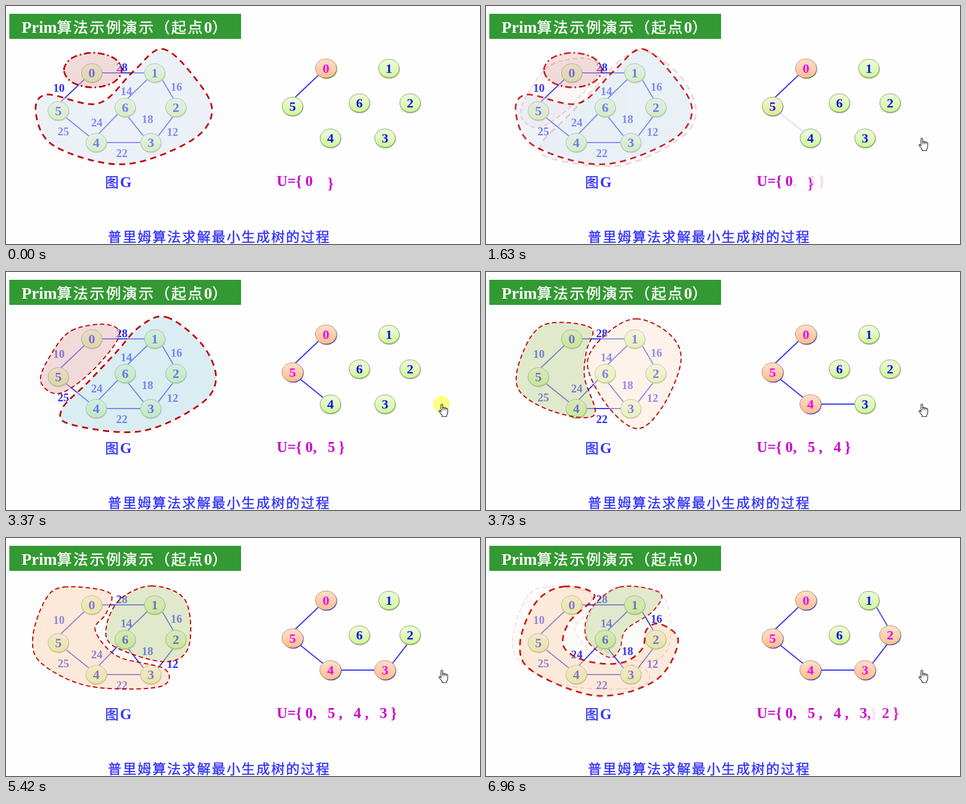
An HTML page for the animation above (8000 ms loop, 851 by 427 pixels).

```html
<!DOCTYPE html>
<html lang="zh">
<head>
<meta charset="utf-8">
<title>Prim</title>
<style>
html, body { margin: 0; width: 100%; height: 100%; overflow: hidden; background: #fefefe; }
svg { display: block; width: 851px; height: 427px; }
text { font: bold 26.67px "Liberation Serif", "Noto Sans CJK SC", "Noto Sans CJK", serif; fill: #3333ff; white-space: pre; }
.num { font-size: 24px; text-anchor: middle; fill: #1212f0; }
.picked { fill: #f000e6; }
.weight { font-size: 20.5px; text-anchor: middle; fill: #2a2aff; }
.edge { stroke: #3030f0; stroke-width: 2; }
.set { fill: #cc00cc; }
.title { font-size: 29.33px; fill: #fff; color: #fff; }
.han { font-size: .91em; font-weight: normal; letter-spacing: .099em; stroke: currentColor; stroke-width: .5; }
.blue { color: #3333ff; }
.zone { stroke: #c00000; fill-opacity: .5; }
.scene, #click, #hand { animation: 8s linear infinite; }
#click { animation-name: click; animation-timing-function: step-end; }
#hand { animation-name: hand; }
@keyframes hand {
  0% { transform: translate(625px, 440px) }
  1.5% { transform: translate(625px, 418px) }
  7.75% { transform: translate(805px, 268px) }
  10.625%, 100% { transform: translate(776px, 236px) }
}
</style>
</head>
<body>
<script>
const clicks = [1500, 3370, 5060, 6660];
const order = [0, 5, 4, 3, 2];
const setText = "0,   5 ,   4 ,   3,   2";
const left = [[154, 120], [267, 120], [305, 182], [260, 245], [162, 245], [94, 188], [214, 182]];
const right = left.map(([x, y]) => [x + 420.5, y - 8]);

// ends, weight, label position; the first five form the tree
const edges = [
  [0, 5, 10, 95, 154], [5, 4, 25, 103, 232], [4, 3, 22, 208, 271],
  [3, 2, 12, 299, 233], [1, 2, 16, 306, 152], [0, 1, 28, 208, 117],
  [6, 4, 24, 163, 216], [3, 6, 18, 254, 210], [1, 6, 14, 216, 160]
];

// key points of the curve round the chosen nodes, one per step
const chosen = [
  ["#e6b9b8", 3, "104,115 119,93 156,84 193,93 208,115 193,137 156,146 119,137"],
  ["#e6b9b8", 2, "118,105 180,94 203,116 152,180 95,218 62,195 82,146"],
  ["#c3d69b", 2, "106,94 188,100 180,143 177,190 194,257 120,250 58,210 66,145"],
  ["#fcd5b5", 2, "104,88 185,98 180,135 160,165 200,212 285,235 275,267 150,266 65,226 48,180 70,112"],
  ["#fcd5b5", 3, "140,87 195,103 150,150 138,190 160,213 205,225 250,222 281,198 288,165 312,154 345,185 305,255 200,283 85,240 61,190 90,115"]
];

// the same for the remaining nodes
const rest = [
  ["#dce6f2", 3, "281,77 340,130 370,190 330,243 210,284 88,252 54,195 72,159 165,175 228,118"],
  ["#b7dee8", 3, "288,81 352,130 377,192 345,240 240,286 115,273 101,245 146,199 197,145 240,98"],
  ["#fdeada", 2, "270,84 330,112 350,160 318,240 272,281 218,240 182,165 215,112"],
  ["#c3d69b", 2, "262,86 322,112 328,195 285,222 195,195 180,160 205,110"],
  ["#c3d69b", 2, "240,88 312,98 300,131 251,165 240,200 220,214 180,180 188,128"]
];

const label = (x, y, s, cls) => `<text x="${x}" y="${y}" class="${cls}">${s}</text>`;
const oval = (x, y, rx, ry, attrs) => `<ellipse cx="${x}" cy="${y}" rx="${rx}" ry="${ry}" ${attrs}/>`;

// slanted lines leave the first node diagonally and meet the second near its top or bottom
function edge(nodes, [u, v]) {
  const a = nodes[u], b = nodes[v];
  const dx = b[0] - a[0], dy = b[1] - a[1];
  const site = ([x, y], deg, sign) => {
    const t = deg * Math.PI / 180;
    return [x + sign * Math.sign(dx) * 19 * Math.cos(t), y + sign * Math.sign(dy) * 17 * Math.sin(t)];
  };
  const start = dy ? 45 : 0;
  const end = Math.abs(dy) > Math.abs(dx) ? 75 : start;
  return `<path class="edge" d="M${site(a, start, 1)}L${site(b, end, -1)}"/>`;
}

// closed Catmull-Rom curve
function smooth(str) {
  const p = str.split(" ").map(s => s.split(",").map(Number)), n = p.length;
  const at = i => p[(i + n) % n];
  const ctl = (a, b, c, sign) => [0, 1].map(k => (b[k] + sign * (c[k] - a[k]) / 6).toFixed(1));
  return `M${p[0]}` + p.map((q, i) =>
    `C${ctl(at(i - 1), q, at(i + 1), 1)} ${ctl(q, at(i + 1), at(i + 2), -1)} ${at(i + 1)}`).join("") + "Z";
}

const zone = ([fill, w, pts], dash = w > 2 ? "11 8" : "8 5") =>
  `<path class="zone" d="${smooth(pts)}" fill="${fill}" stroke-width="${w}" stroke-dasharray="${dash}"/>`;

function node([x, y], i, picked, shade) {
  const body = picked
    ? oval(x + 1, y + 1, 19, 17.5, `fill="${shade}"`) + oval(x, y, 19, 17, 'fill="url(#orange)" stroke="#c08a68"')
    : oval(x + .5, y + 1.5, 19, 17, 'fill="#a9b596"') + oval(x, y, 18.5, 16.5, 'fill="url(#green)" stroke="#86a356"');
  return body + label(x, y + 8, i, picked ? "num picked" : "num");
}

function scene(k) {
  const members = order.slice(0, k + 1);
  const graph = edges.map(e => edge(left, e)).join("") +
    left.map((p, i) => node(p, i)).join("") +
    edges.map(([, , w, x, y]) => label(x, y, w, "weight")).join("");
  const areas = zone(rest[k]) + zone(chosen[k], k ? undefined : "12 5 3 5");
  const tree = edges.slice(0, k + 1).map(e => edge(right, e)).join("") +
    right.map((p, i) => node(p, i, members.includes(i), k ? "#3a32c8" : "#5f8a2c")).join("");
  const list = setText.slice(0, setText.indexOf(order[k]) + 1);
  const brace = k ? " }" : '    <tspan dy="4">}</tspan>';
  return `<g class="scene" style="animation-name:s${k}"><rect width="851" height="427" fill="#fefefe"/>` +
    graph + areas + tree + label(486, 323, "U={ " + list + brace, "set") + "</g>";
}

const pct = ms => ms / 80 + "%";
const fades = clicks.map((t, i) =>
  `@keyframes s${i + 1} { 0%, ${pct(t + 90)} { opacity: 0 } ${pct(t + 330)}, 100% { opacity: 1 } }`);
const flashes = clicks.map(t => `${pct(t)} { opacity: 1 } ${pct(t + 120)} { opacity: 0 }`);
const style = document.createElement("style");
style.textContent = fades.join("\n") + `@keyframes click { 0%, 100% { opacity: 0 } ${flashes.join(" ")} }`;
document.head.append(style);

const gradient = (id, a, b) =>
  `<linearGradient id="${id}" x2="0" y2="1"><stop stop-color="${a}"/><stop offset="1" stop-color="${b}"/></linearGradient>`;
const han = s => `<tspan class="han">${s}</tspan>`;

document.body.innerHTML = `<svg viewBox="0 0 851 427">
  <defs>${gradient("green", "#effbdd", "#d0f898")}${gradient("orange", "#fde0cc", "#fbbd90")}</defs>
  ${order.map((_, k) => scene(k)).join("")}
  <rect x="6" y="14" width="416" height="45" fill="#339933"/>
  ${label(28, 48, `Prim${han("算法示例演示（起点")}0${han("）")}`, "title")}
  ${label(178, 325, han("图") + "G", "blue")}
  ${label(183, 423, han("普里姆算法求解最小生成树的过程"), "blue")}
  <circle id="click" cx="782" cy="237" r="15" fill="#ffff80"/>
  <g id="hand" fill="#fff" stroke="#222" stroke-width="1.2" stroke-linejoin="round">
    <path d="M5,15V2.5Q5,1 6.5,1T8,2.5V8Q9.5,6.5 11,8Q12.5,7 14,8.5Q17,8 17,11V16Q17,19 15,21V23.5H7V21Q5,19 1.5,14.5Q1,12 3,12.5Z"/>
    <path d="M8,8V12M11,8V12M14,9V12" stroke-width="1"/>
  </g>
</svg>`;
</script>
</body>
</html>
```
